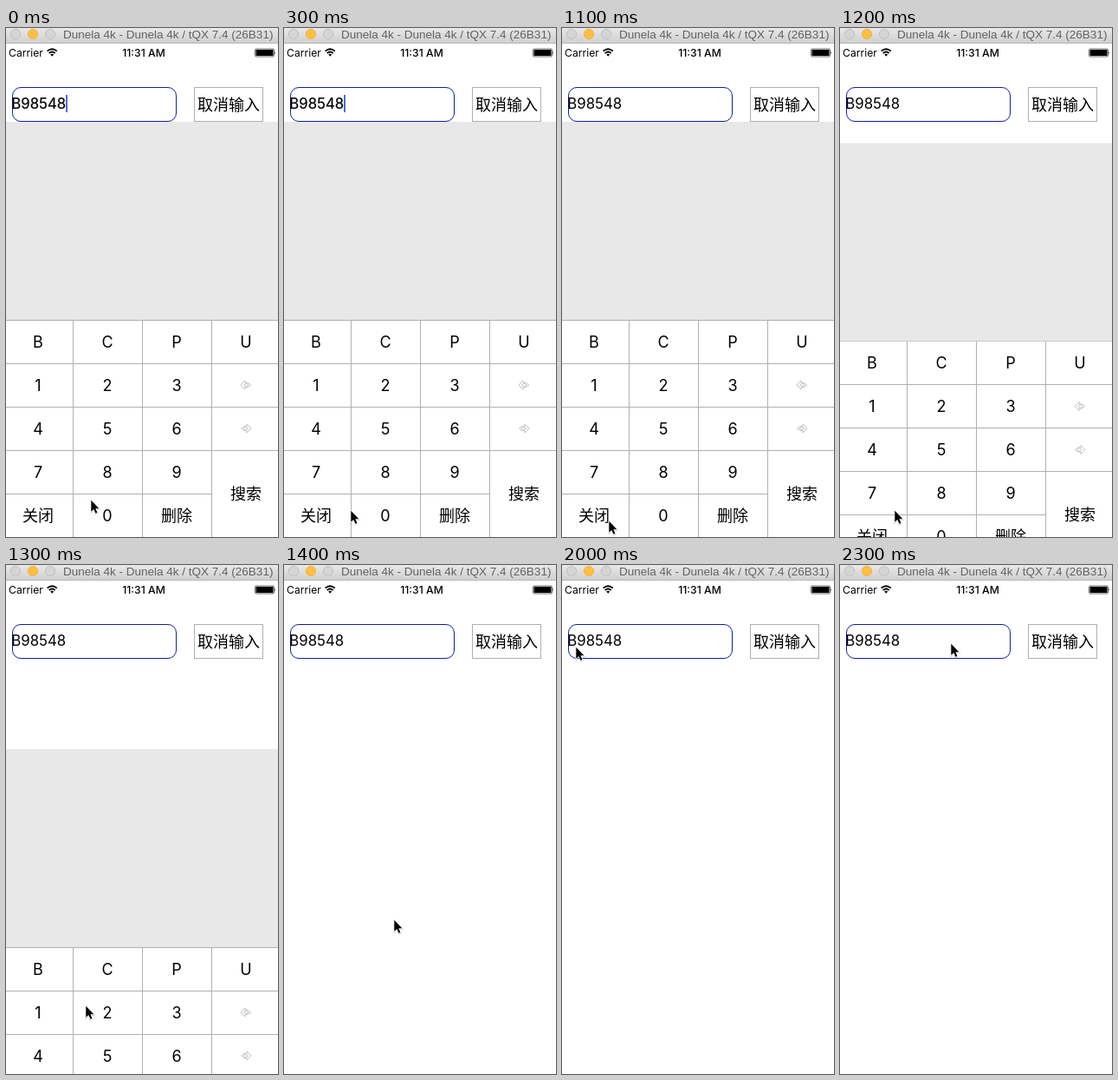
Write an HTML page that moves like this. It is 314 px wide and 586 px high and loops after 2.4 s.

```html
<!DOCTYPE html>
<html lang="zh-CN">
<head>
<meta charset="utf-8">
<title>Stock keypad</title>
<style>
  html, body { margin: 0; width: 100%; height: 100%; overflow: hidden; background: #fff; }
  svg { display: block; width: 100vw; height: 100vh; }
  text { font-family: Inter, "Noto Sans CJK SC", "Noto Sans CJK", sans-serif; fill: #000; }
  .title { font: 13.5px "Liberation Sans", Arial, sans-serif; fill: #626262; }
  .status { font-size: 12.2px; }
  .key { font-size: 18px; text-anchor: middle; }
  .line { fill: #b0b0b0; }
  .glyph { fill: #fff; stroke: #aaa; stroke-width: .7; }
</style>
</head>
<body>
<svg viewBox="0 0 314 586">
  <defs>
    <linearGradient id="bar" x2="0" y2="1">
      <stop offset="0" stop-color="#e9e8e9"/>
      <stop offset="1" stop-color="#d1d0d1"/>
    </linearGradient>
    <path id="arrow" d="M0 0V13L3 10.3L5.1 15L7.1 14.1L5.1 9.5H9Z"/>
  </defs>
  <rect width="314" height="586" fill="#fff"/>

  <g id="pad">
    <rect y="336" width="314" height="250" fill="#fff"/>
    <g id="lines"></g>
    <rect y="108" width="314" height="228" fill="#e8e8e8"/>
    <g id="keys"></g>
  </g>

  <rect width="314" height="17" fill="url(#bar)"/>
  <rect y="17" width="314" height="1" fill="#b9b8b9"/>
  <g fill="#d6d5d6" stroke="#c1c0c1">
    <circle cx="11" cy="7" r="5.6"/>
    <circle cx="31" cy="7" r="5.6" fill="#fdbf43" stroke="#f0b23e"/>
    <circle cx="51" cy="7" r="5.6"/>
  </g>
  <text class="title" x="66" y="12">Dunela 4k - Dunela 4k / tQX 7.4 (26B31)</text>

  <text class="status" x="3" y="32.5">Carrier</text>
  <g fill="none" stroke="#000" stroke-width="1.7">
    <path d="M47.6 26.7Q53.2 21.8 58.8 26.7M49.7 29Q53.2 26 56.7 29"/>
    <path d="M51.2 30.6Q53.2 29 55.2 30.6L53.2 32.8Z" fill="#000" stroke="none"/>
  </g>
  <text class="status" x="159" y="32.5" text-anchor="middle" font-weight="500">11:31 AM</text>
  <rect x="287.5" y="24" width="22" height="9" rx="1.5" fill="#fff" stroke="#000" stroke-width=".6"/>
  <rect x="288.5" y="25" width="20" height="7" rx=".6"/>
  <path d="M310.5 27Q312 28.5 310.5 30Z"/>

  <rect x="7.5" y="68.5" width="189" height="39" rx="9.5" fill="#fff" stroke="#101ea6"/>
  <text id="code" x="6.3" y="93" font-size="16.8" stroke="#000">B98548</text>
  <rect id="caret" x="69" y="77" width="2" height="20" fill="#4a6fc8"/>
  <rect x="217.5" y="68.5" width="79" height="39" fill="#fff" stroke="#b0b0b0"/>
  <text class="key" x="257" y="95">取消输入</text>

  <g id="cursor">
    <use href="#arrow" x=".5" y="1.6" stroke="#000" stroke-width="2" opacity=".14"/>
    <use href="#arrow" x=".3" y=".8" stroke="#fff" stroke-width="1.4" paint-order="stroke" stroke-linejoin="round"/>
  </g>
</svg>
<script>
const LOOP = 2400, STEP = 100;
const $ = id => document.getElementById(id);

function add(parent, tag, attrs, text = '') {
  const el = document.createElementNS('http://www.w3.org/2000/svg', tag);
  for (const name in attrs) el.setAttribute(name, attrs[name]);
  el.textContent = text;
  parent.append(el);
}

const rows = ['B C P U', '1 2 3 ←', '4 5 6 →', '7 8 9', '关闭 0 删除'];
const arrow = 'M-6 0L-1 -5V-2.6H2L5.6 0L2 2.6H-1V5ZM-2.4 0L.4 -2L3 0L.4 2Z';

rows.forEach((row, r) => {
  const y = 361 + r * 50;
  add($('lines'), 'rect', { class: 'line', y: y - 25, width: r < 4 ? 314 : 237, height: 1 });
  row.split(' ').forEach((label, c) => {
    const x = 37 + c * 80;
    if (label === '←' || label === '→') {
      const flip = label === '→' ? -1 : 1;
      add($('keys'), 'path', { class: 'glyph', d: arrow, transform: `translate(${x} ${y}) scale(${flip} 1)` });
    } else {
      add($('keys'), 'text', { class: 'key', x, y: y + 6.7 }, label);
    }
  });
});
add($('keys'), 'text', { class: 'key', x: 277, y: 542.7 }, '搜索');
for (const x of [77, 157, 237]) {
  add($('lines'), 'rect', { class: 'line', x, y: 336, width: 1, height: 251 });
}

// Key points: [ms, ...values], linear in between
const pointer = [
  [0, 98, 543], [600, 55, 567], [900, 54, 567], [1100, 54, 567], [1200, 63, 555],
  [1300, 92, 507], [1400, 127, 408], [1700, 157, 263], [2000, 16, 94], [2300, 128, 90]
];
const slide = [[1100, 0], [1200, 24.5], [1300, 104], [1400, 480]];

function along(keys, t) {
  const next = keys.findIndex(key => key[0] > t);
  if (next < 1) return keys.at(next).slice(1);
  const [t0, ...from] = keys[next - 1];
  const [t1, ...to] = keys[next];
  const u = (t - t0) / (t1 - t0);
  return from.map((v, i) => v + (to[i] - v) * u);
}

const move = (id, x, y) => $(id).setAttribute('transform', `translate(${x} ${y})`);

function draw(now) {
  const t = Math.floor((now % LOOP) / STEP) * STEP;
  const [x, y] = along(pointer, t).map(Math.ceil);
  const [offset] = along(slide, t);
  move('cursor', x, y);
  move('pad', 0, offset);
  move('lines', 0, Math.floor(offset) - offset); // keep the grid on whole pixels
  $('caret').setAttribute('opacity', t < 500 ? 1 : t < 600 ? .5 : 0);
  $('code').setAttribute('stroke-width', t < 1100 ? .2 : 0);
}

const start = performance.now();
function tick() {
  draw(performance.now() - start);
  requestAnimationFrame(tick);
}
tick();
</script>
</body>
</html>
```
